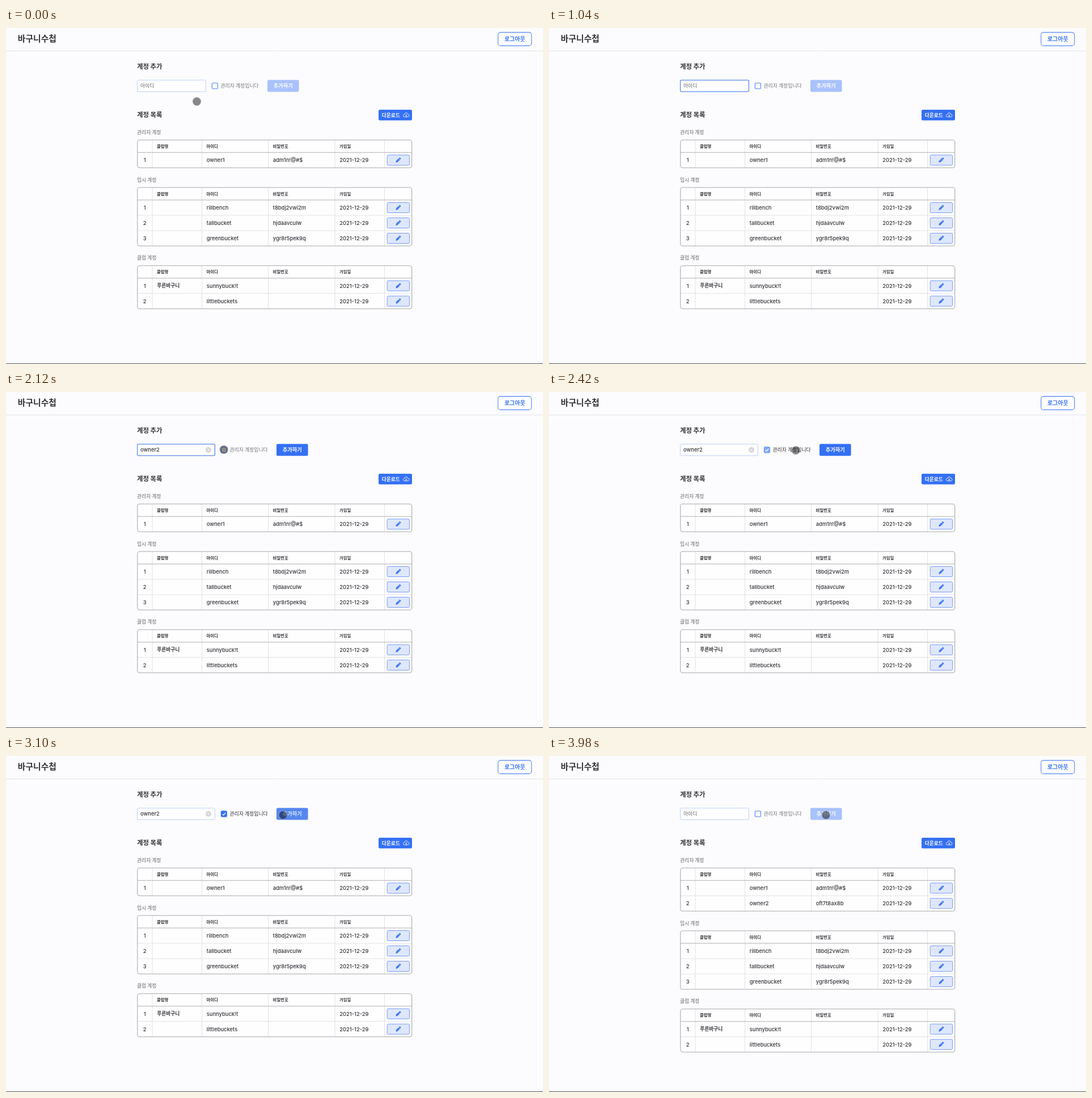
An HTML page with a canvas that plays this animation: 947 px wide and 592 px high, repeating every 4.28 s.

```html
<!DOCTYPE html>
<html lang="ko">
<head>
<meta charset="utf-8">
<title>계정 관리</title>
<style>
html, body { margin: 0; width: 100%; height: 100%; overflow: hidden; background: #fcfcfe; }
canvas { display: block; width: 947px; height: 592px; }
</style>
</head>
<body>
<canvas id="stage"></canvas>
<script>
const W = 947, H = 592, LOOP = 4280;
const canvas = document.getElementById('stage');
const dpr = window.devicePixelRatio || 1;
canvas.width = Math.round(W * dpr);
canvas.height = Math.round(H * dpr);
const ctx = canvas.getContext('2d');

const KO = '"Noto Sans CJK KR", "Noto Sans CJK", Inter, sans-serif';
const EN = 'Inter, "Noto Sans CJK KR", sans-serif';
const BLUE = [52, 112, 244], PALE = [169, 194, 252], PRESSED = [86, 134, 238];
const INK = '#333438', GRAY = '#66686d';
const COLS = [258, 345.5, 462.5, 580, 667.5];
const HEADS = ['클럽명', '아이디', '비밀번호', '가입일'];
const DATE = '2021-12-29';

const NEW_ID = 'owner2';
const KEYS = [1080, 1280, 1440, 1540, 1580, 1640];
const T = { focus: 740, hide: 940, check: 2200, press: 3000, done: 3180 };
const MOVES = [
  { at: 300, ms: 200, from: [336.5, 129.5], to: [293, 104] },
  { at: 1780, ms: 400, from: [293, 104], to: [384.4, 101.5] },
  { at: 2340, ms: 400, from: [384.4, 101.5], to: [488.5, 104] }
];

const admins = [['', 'owner1', 'adm1n!@#$']];
const added = ['', NEW_ID, 'oft7t8ax8b'];
const temps = [
  ['', 'rillbench', 't8bdj2vwi2m'],
  ['', 'tallbucket', 'hjdaavculw'],
  ['', 'greenbucket', 'ygr8r5pek9q']
];
const clubs = [['푸른바구니', 'sunnybuck!t', ''], ['', 'littlebuckets', '']];

const ramp = (t, at, ms) => Math.min(1, Math.max(0, (t - at) / ms));
const easeOut = p => 1 - (1 - p) ** 3;
const lerp = (a, b, p) => a + (b - a) * p;
const mix = (a, b, p) => a.map((v, i) => lerp(v, b[i], p));
const rgb = (c, a = 1) => `rgba(${c.map(Math.round).join(',')},${a})`;

function text(str, x, cy, size, color, weight = 500, align = 'left') {
  const korean = /[가-힣]/.test(str);
  ctx.font = `${weight} ${size}px ${korean ? KO : EN}`;
  ctx.fillStyle = color;
  ctx.textAlign = align;
  ctx.fillText(str, x, cy + size * 0.37);
}

function box(x, y, w, h, r, fill, stroke, line = 1) {
  ctx.beginPath();
  ctx.roundRect(x, y, w, h, r);
  if (fill) { ctx.fillStyle = fill; ctx.fill(); }
  if (stroke) { ctx.strokeStyle = stroke; ctx.lineWidth = line; ctx.stroke(); }
}

function path(points, color, width = 1) {
  ctx.beginPath();
  points.forEach(([x, y], i) => i ? ctx.lineTo(x, y) : ctx.moveTo(x, y));
  ctx.strokeStyle = color;
  ctx.lineWidth = width;
  ctx.stroke();
}

function disc(x, y, r, fill) {
  ctx.beginPath();
  ctx.arc(x, y, r, 0, Math.PI * 2);
  ctx.fillStyle = fill;
  ctx.fill();
}

function pencil(x, y) {
  ctx.save();
  ctx.translate(x, y);
  ctx.rotate(-Math.PI / 4);
  ctx.fillStyle = rgb(BLUE);
  ctx.beginPath();
  ctx.moveTo(-6, 0);
  ctx.lineTo(-3.6, -1.7);
  ctx.lineTo(2.6, -1.7);
  ctx.lineTo(2.6, 1.7);
  ctx.lineTo(-3.6, 1.7);
  ctx.fill();
  box(3.2, -1.7, 2.2, 3.4, 0.7, rgb(BLUE));
  path([[-3, 0], [2, 0]], '#a9c0f9', 0.5);
  ctx.restore();
}

function cloud(x, y) {
  ctx.beginPath();
  ctx.moveTo(x - 2.5, y + 3.2);
  ctx.bezierCurveTo(x - 6.5, y + 3.2, x - 6, y - 1.3, x - 3, y - 1.3);
  ctx.bezierCurveTo(x - 2.4, y - 5, x + 2.6, y - 4.6, x + 3, y - 1.3);
  ctx.bezierCurveTo(x + 6, y - 1.2, x + 6, y + 3.2, x + 2.5, y + 3.2);
  ctx.closePath();
  ctx.strokeStyle = '#fff';
  ctx.lineWidth = 0.9;
  ctx.stroke();
  path([[x, y - 1.5], [x, y + 2]], '#fff', 0.9);
  path([[x - 1.5, y + 0.5], [x, y + 2], [x + 1.5, y + 0.5]], '#fff', 0.9);
}

function table(label, top, rows) {
  const head = top + 22, bottom = head + rows.length * 27;
  text(label, 231, top - 13.5, 8.8, GRAY);
  box(231.8, top, 483.9, bottom - top, 4, '#fefeff');
  COLS.forEach(x => path([[x, top], [x, bottom]], '#dedfe2', 0.9));
  path([[232, head], [715.5, head]], '#aeafb2', 1.1);
  HEADS.forEach((name, i) => text(name, COLS[i] + 8, top + 11, 7.4, INK, 600));
  rows.forEach((row, i) => {
    const y = head + i * 27, cy = y + 13.5;
    if (i) path([[232, y], [715.5, y]], '#dedfe2', 0.9);
    text(String(i + 1), 244.7, cy, 9.4, INK, 500, 'center');
    [...row, DATE].forEach((cell, c) => {
      const korean = c === 0;
      text(cell, COLS[c] + 8.2, cy, korean ? 8.7 : 9.4, INK, korean ? 600 : 500);
    });
    box(672.2, y + 4.5, 39.3, 18, 2, '#dfe7fd', '#779cf6');
    pencil(691.7, cy);
  });
  box(231.8, top, 483.9, bottom - top, 4, null, '#a8a9ac', 1.1);
}

function drawHeader() {
  ctx.fillStyle = '#fcfcfe';
  ctx.fillRect(0, 0, W, H);
  text('바구니수첩', 20.8, 19, 14.8, INK, 600);
  path([[0, 40.5], [W, 40.5]], '#e2e3e7');
  box(867.7, 7.6, 59, 23.8, 4.5, '#fefeff', '#5585f5', 1.1);
  text('로그아웃', 897.3, 19.3, 10, rgb(BLUE), 600, 'center');
  text('계정 추가', 231, 68, 11.4, INK, 600);
  text('계정 목록', 231, 152.7, 11.4, INK, 600);
  box(657, 144, 59, 18.7, 2.2, rgb(BLUE));
  text('다운로드', 662.7, 153.5, 8.7, '#fff', 600);
  cloud(705.8, 153.5);
}

function drawForm(t) {
  const done = t >= T.done;
  const typed = done ? '' : NEW_ID.slice(0, KEYS.filter(k => t >= k).length);
  const shift = typed ? 16 : 0;
  const focus = ramp(t, T.focus - 20, 60) * (1 - ramp(t, T.check, 60));
  const border = mix([185, 206, 251], [92, 139, 238], focus);

  box(231.6, 91.8, 120.8 + shift, 20.3, 2, '#fefeff', rgb(border), 1 + 0.3 * focus);
  if (typed) {
    text(typed, 237, 102, 9.4, INK);
    disc(357, 102, 4.9, '#d3d5da');
    path([[355.3, 100.3], [358.7, 103.7]], '#fff', 0.9);
    path([[358.7, 100.3], [355.3, 103.7]], '#fff', 0.9);
  } else {
    text('아이디', 237, 101.8, 8.8, '#626469');
  }
  const caret = (t >= 780 && t < T.hide) || (t >= KEYS[0] && t < 2040);
  if (caret) {
    ctx.font = `500 9.4px ${EN}`;
    const x = 237.3 + ctx.measureText(typed).width;
    path([[x, 96.5], [x, 107.5]], INK, 0.9);
  }

  const checked = t >= T.check && !done;
  const bx = 363.4 + shift;
  box(bx, 97, 10, 10, 1.5, '#fff', rgb(BLUE, checked ? 0.35 : 0.9), 1.1);
  if (checked) {
    const alpha = 0.6 * ramp(t, T.check, 100) + 0.4 * ramp(t, 2560, 160);
    box(bx - 0.5, 96.5, 11, 11, 1.8, rgb(BLUE, alpha));
    path([[bx + 2.3, 102.1], [bx + 4.3, 104.2], [bx + 8, 99.8]], '#fff', 1.3);
  }
  text('관리자 계정입니다', 378.4 + shift, 101.8, 8.9, checked ? INK : '#74767b');

  let fill = mix(PALE, BLUE, ramp(t, KEYS[0], 200));
  fill = mix(fill, PRESSED, ramp(t, T.press, 100));
  fill = mix(fill, PALE, ramp(t, T.done, 200));
  box(461 + shift, 91.5, 55.6, 21, 2.2, rgb(fill));
  const ink = t >= T.press && !done ? '#dcebff' : '#fff';
  text('추가하기', 488.8 + shift, 101.8, 9.3, ink, 600, 'center');
}

function drawCursor(t) {
  if (t >= T.hide && t < 1800) return;
  let pos = MOVES[0].from;
  for (const m of MOVES) {
    if (t < m.at) break;
    const p = easeOut(ramp(t, m.at, m.ms));
    pos = m.from.map((v, i) => lerp(v, m.to[i], p));
  }
  disc(...pos, 7.5, 'rgba(0,0,0,.46)');
  ctx.strokeStyle = 'rgba(235,235,240,.45)';
  ctx.lineWidth = 0.9;
  ctx.stroke();
}

function draw(t) {
  ctx.setTransform(dpr, 0, 0, dpr, 0, 0);
  drawHeader();
  const done = t >= T.done, dy = done ? 27 : 0;
  table('관리자 계정', 197.3, done ? [...admins, added] : admins);
  table('임시 계정', 281 + dy, temps);
  table('클럽 계정', 418.7 + dy, clubs);
  drawForm(t);
  drawCursor(t);
  ctx.fillStyle = '#55565a';
  ctx.fillRect(0, 591, W, 1);
}

const start = performance.now();
function tick() {
  const t = (performance.now() - start) % LOOP;
  draw(Math.floor(t / 20) * 20);
  requestAnimationFrame(tick);
}
tick();
</script>
</body>
</html>
```
